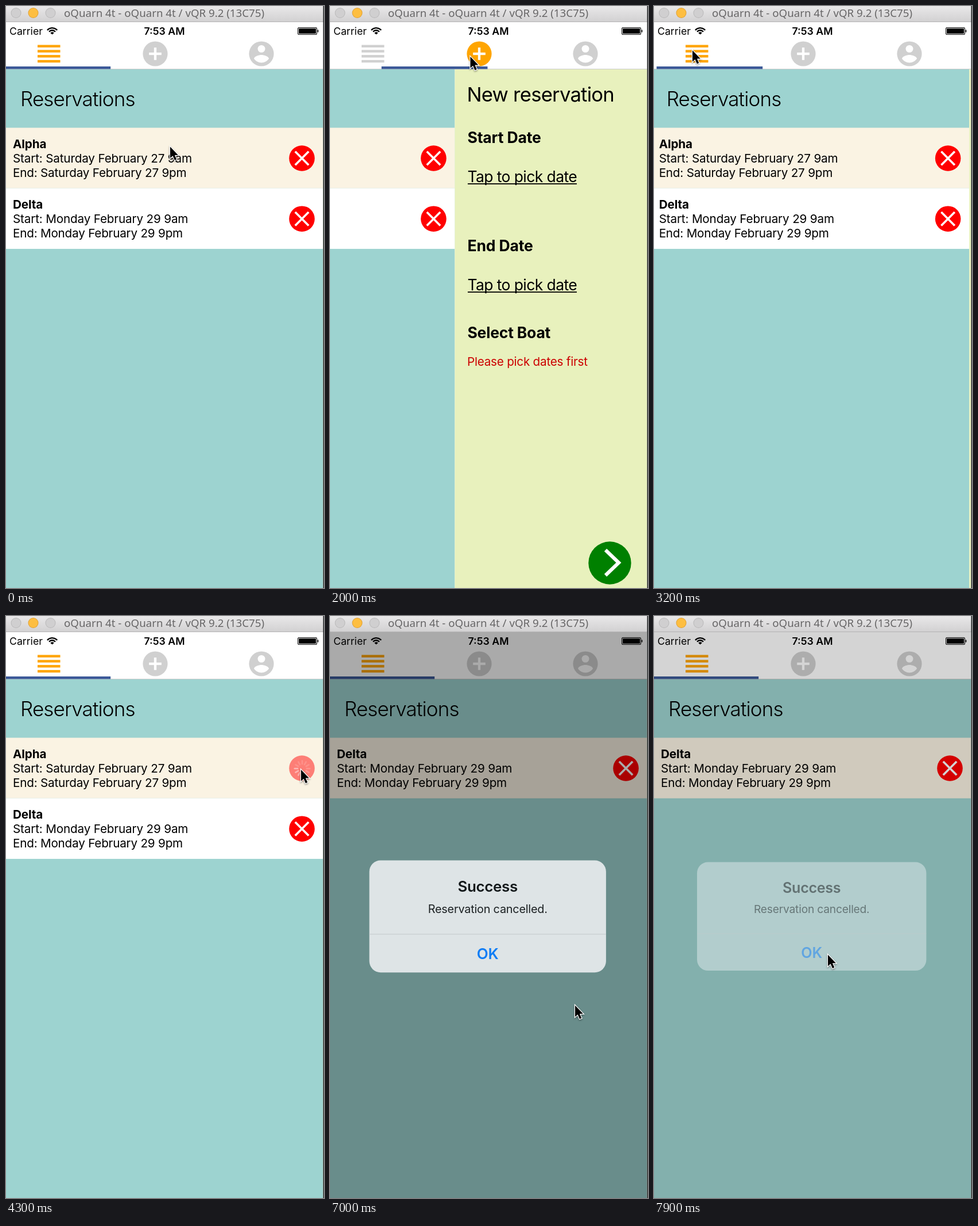
An HTML page with a canvas for the animation above (8 s loop, 554 by 1011 pixels).

```html
<!DOCTYPE html>
<html lang="en">
<head>
<meta charset="utf-8">
<title>Reservations</title>
<style>
html, body { margin: 0; width: 100%; height: 100%; overflow: hidden; background: #9dd3d0; }
canvas { display: block; width: 554px; height: 1011px; }
</style>
</head>
<body>
<canvas id="stage" width="554" height="1011"></canvas>
<script>
const ctx = document.getElementById('stage').getContext('2d');
const W = 554, H = 1011, PAGE = 552.5, LOOP = 8000, STEP = 100;
const SANS = 'Inter, "Liberation Sans", sans-serif';
const TEAL = '#9dd3d0', GREY = '#d0d0d0', ORANGE = '#ffa500';

// Moments of the story, in ms
const TAP_NEW = 1720, GO_NEW = 1800, TAP_LIST = 2820, GO_LIST = 2866;
const TAP_CANCEL = 4200, DONE = 6800, DISMISS = 7780;

// Pointer stops: time, x, y
const POINTER = [
  [0, 285, 243], [600, 285, 243], [1600, 243.5, 86.5], [2200, 243.5, 86.5],
  [2750, 66, 75.5], [3300, 66, 75.5], [4150, 513, 265.5], [4600, 513, 265.5],
  [5500, 426, 675], [7100, 426, 675], [7600, 302, 587], [LOOP, 302, 587]
];

const ARROW = new Path2D('M0 0V22.5L5.2 17.8 9 26.6 12.8 25 9 16.4H15.8Z');
const TORSO = new Path2D('M12 19.2c-2.5 0-4.71-1.28-6-3.22.03-1.99 4-3.08 6-3.08 ' +
  '1.99 0 5.97 1.09 6 3.08-1.29 1.94-3.5 3.22-6 3.22z');

const clamp = v => Math.min(1, Math.max(0, v));
const smooth = v => { v = clamp(v); return v * v * (3 - 2 * v); };
const mix = (a, b, k) => a + (b - a) * k;

function rect(x, y, w, h, color) {
  ctx.fillStyle = color;
  ctx.fillRect(x, y, w, h);
}

function round(x, y, w, h, r, color) {
  ctx.beginPath();
  ctx.roundRect(x, y, w, h, r);
  ctx.fillStyle = color;
  ctx.fill();
}

function disc(x, y, r, color) {
  ctx.beginPath();
  ctx.arc(x, y, r, 0, Math.PI * 2);
  ctx.fillStyle = color;
  ctx.fill();
}

function line(points, width, color, cap = 'butt') {
  ctx.beginPath();
  points.forEach(([x, y]) => ctx.lineTo(x, y));
  ctx.lineWidth = width;
  ctx.lineCap = cap;
  ctx.strokeStyle = color;
  ctx.stroke();
}

function text(str, x, y, size, { weight = 400, color = '#000', track = 0, align = 'left', family = SANS } = {}) {
  ctx.font = `${weight} ${size}px ${family}`;
  ctx.letterSpacing = track + 'px';
  ctx.textAlign = align;
  ctx.fillStyle = color;
  ctx.fillText(str, x, y);
}

function layer(draw, x = 0, y = 0, alpha = 1, scale = 1) {
  ctx.save();
  ctx.translate(x, y);
  ctx.scale(scale, scale);
  ctx.globalAlpha *= alpha;
  draw();
  ctx.restore();
}

// Opacity of a touchable around its release time
function touch(t, release) {
  if (t < release) return mix(1, 0.2, smooth((t - release + 120) / 120));
  return mix(0.2, 1, smooth((t - release) / 250));
}

const pageAt = t => smooth((t - GO_NEW) / 350) - smooth((t - GO_LIST) / 350);

function titleBar() {
  const g = ctx.createLinearGradient(0, 0, 0, 27);
  g.addColorStop(0, '#e9e8e9');
  g.addColorStop(1, '#d2d1d2');
  rect(0, 0, W, 27, g);
  rect(0, 27, W, 1, '#b4b3b4');
  [['#d0cfd0', '#b9b8b9'], ['#fdbe41', '#dfa136'], ['#d0cfd0', '#b9b8b9']].forEach(([fill, edge], i) => {
    disc(17.5 + 30 * i, 12, 9, edge);
    disc(17.5 + 30 * i, 12, 8, fill);
  });
  text('oQuarn 4t - oQuarn 4t / vQR 9.2 (13C75)', 101, 19, 18.7,
    { color: '#666566', family: '"Noto Sans", "Open Sans", sans-serif' });
}

function statusBar() {
  text('Carrier', 6, 49.5, 17.7);
  text('7:53 AM', 276, 49.5, 17.7, { weight: 600, align: 'center' });
  ctx.strokeStyle = '#000';
  ctx.lineWidth = 2.4;
  ctx.lineCap = 'butt';
  for (const r of [11.4, 7.2]) {
    ctx.beginPath();
    ctx.arc(80.5, 49.5, r, -Math.PI * 0.77, -Math.PI * 0.23);
    ctx.stroke();
  }
  ctx.beginPath();
  ctx.moveTo(80.5, 49.5);
  ctx.arc(80.5, 49.5, 4.3, -Math.PI * 0.77, -Math.PI * 0.23);
  ctx.fillStyle = '#000';
  ctx.fill();
  round(508, 37, 34, 13, 2.5, '#000');
  round(509, 38, 32, 11, 1.8, '#fff');
  round(510, 39, 30, 9, 1, '#000');
  round(542.7, 41.2, 1.6, 4.6, 0.8, '#000');
}

function tabs(t) {
  const onNew = t >= TAP_NEW && t < TAP_LIST;
  layer(() => {
    for (let i = 0; i < 4; i++) rect(55, 67.6 + 8.75 * i, 39.5, 4.4, onNew ? GREY : ORANGE);
  }, 0, 0, touch(t, TAP_LIST));
  layer(() => {
    disc(0, 0, 21.6, onNew ? ORANGE : GREY);
    rect(-10.8, -2.15, 21.6, 4.3, '#fff');
    rect(-2.15, -10.8, 4.3, 21.6, '#fff');
  }, 260, 83, touch(t, TAP_NEW));
  layer(() => {
    disc(12, 12, 10, GREY);
    disc(12, 8, 3, '#fff');
    ctx.fillStyle = '#fff';
    ctx.fill(TORSO);
  }, 445 - 12 * 2.16, 83 - 12 * 2.16, 1, 2.16);
  rect(0, 109, PAGE, 1, '#cccccc');
  rect(-2.5 + 184.5 * pageAt(t - 25), 105, 184.7, 4.5, '#3b5998');
}

function spinner(t) {
  const head = Math.floor((t - 6500) / (1000 / 12));
  for (let i = 0; i < 12; i++) {
    const age = (((head - i) % 12) + 12) % 12;
    const a = i * Math.PI / 6, s = Math.sin(a), c = -Math.cos(a);
    const glow = Math.max(0.3, 0.95 - age * 0.1);
    line([[s * 8, c * 8], [s * 13.3, c * 13.3]], 2.7, `rgba(255,255,255,${glow})`, 'round');
  }
}

function cancelButton(y, t, busy, alpha) {
  layer(() => {
    disc(0, 0, 22.3, '#f00');
    if (busy) layer(() => spinner(t), 0.5, 0.5);
    else for (const d of [1, -1]) line([[-11.7, -11.7 * d], [11.7, 11.7 * d]], 3.6, '#fff');
  }, 515.5, y, alpha);
}

function row(i, name, day, t, busy = false, alpha = 1) {
  const y = 211.5 + 105.2 * i;
  rect(0, y, PAGE, 105.2, i ? '#fff' : '#faf3e3');
  text(name, 12, y + 35, 20.65, { weight: 700, track: -0.1 });
  text(`Start: ${day} 9am`, 12, y + 60.5, 20.65, { track: -0.15 });
  text(`End: ${day} 9pm`, 12, y + 85.5, 20.65, { track: -0.2 });
  cancelButton(y + 53, t, busy, alpha);
}

function listPage(t) {
  rect(0, 110, PAGE, H - 110, TEAL);
  text('Reservations', 25, 174, 35, { weight: 300, track: -0.85 });
  const gone = t >= DONE;
  if (!gone) row(0, 'Alpha', 'Saturday February 27', t, t >= TAP_CANCEL, touch(t, TAP_CANCEL));
  row(gone ? 0 : 1, 'Delta', 'Monday February 29', t);
}

function toggle(y, on) {
  round(458, y, 75.5, 45.7, 22.9, on ? '#4bd864' : '#dfe0df');
  if (!on) round(460, y + 2, 71.5, 41.7, 20.9, '#e8f1bd');
  ctx.save();
  ctx.shadowColor = 'rgba(0,0,0,.3)';
  ctx.shadowBlur = 6;
  ctx.shadowOffsetY = 4;
  disc(on ? 510.4 : 480.4, y + 22.6, 20.8, '#fff');
  ctx.restore();
}

function dateField(y, title, on, label) {
  text(title, 22, y, 26.5, { weight: 700, track: -0.15 });
  text('Tap to pick date', 22, y + 68, 26.5, { track: -0.6 });
  rect(22.5, y + 70.5, 190, 1.8, '#000');
  toggle(y + 28.3, on);
  text(label, 457, y + 106, 17.7, { track: -0.12 });
}

function newPage() {
  rect(0, 110, PAGE, H - 110, '#e8f1bd');
  text('New reservation', 21, 166, 34.6, { track: -0.75 });
  dateField(237.5, 'Start Date', false, 'Morning');
  dateField(425.5, 'End Date', true, 'Evening');
  text('Select Boat', 22, 576.5, 26.5, { weight: 700, track: -0.2 });
  text('Please pick dates first', 21.5, 625, 20.65, { color: '#cc0000', track: -0.22 });
  disc(270, 967.5, 37.2, '#008000');
  line([[262.5, 945], [285.5, 967], [262.5, 989]], 6.2, '#fff');
}

function pages(t) {
  const p = pageAt(t);
  ctx.save();
  ctx.beginPath();
  ctx.rect(0, 110, PAGE, H - 110);
  ctx.clip();
  layer(() => listPage(t), -PAGE * p);
  layer(newPage, PAGE * (1 - p));
  ctx.restore();
}

function alertBox(t) {
  if (t < DONE) return;
  const shown = 1 - Math.exp(-(t - DONE) / 110);
  const left = t < DISMISS ? 1 : Math.exp(-(t - DISMISS) / 140);
  rect(0, 28, PAGE, H - 28, `rgba(0,0,0,${0.4 * shown * left})`);
  layer(() => {
    round(-199.7, -94.3, 399.4, 188.6, 19, 'rgba(238,241,243,.88)');
    rect(-199.7, 29.5, 399.4, 1, '#c3cacc');
    const mid = { align: 'center' };
    text('Success', 0, -41, 25.1, { ...mid, weight: 600, track: -0.3, color: '#13181a' });
    text('Reservation cancelled.', 0, -5.5, 19.2, { ...mid, track: -0.2, color: '#1c2123' });
    text('OK', 0, 72, 25.1, { ...mid, weight: 600, color: '#0f7df5' });
  }, 274.7, 521.8, clamp(shown * 1.2) * left ** 0.8, 1 + 0.2 * (1 - shown));
}

function pointer(t) {
  const i = POINTER.findIndex(p => p[0] > t);
  const [t0, x0, y0] = POINTER[i - 1], [t1, x1, y1] = POINTER[i];
  const k = smooth((t - t0) / (t1 - t0));
  layer(() => {
    ctx.save();
    ctx.shadowColor = 'rgba(0,0,0,.4)';
    ctx.shadowBlur = 3;
    ctx.shadowOffsetY = 1.5;
    ctx.lineWidth = 2.8;
    ctx.strokeStyle = '#fff';
    ctx.stroke(ARROW);
    ctx.restore();
    ctx.fillStyle = '#000';
    ctx.fill(ARROW);
  }, mix(x0, x1, k) + 1, mix(y0, y1, k) + 1.5, 1, 0.88);
}

function draw(t) {
  rect(0, 0, W, H, '#fff');
  pages(t);
  statusBar();
  tabs(t);
  alertBox(t);
  titleBar();
  rect(PAGE, 0, W - PAGE, H, '#26282a');
  pointer(t);
}

function tick() {
  const t = performance.now() % LOOP;
  draw(Math.floor(t / STEP) * STEP);
  requestAnimationFrame(tick);
}
tick();
</script>
</body>
</html>
```
